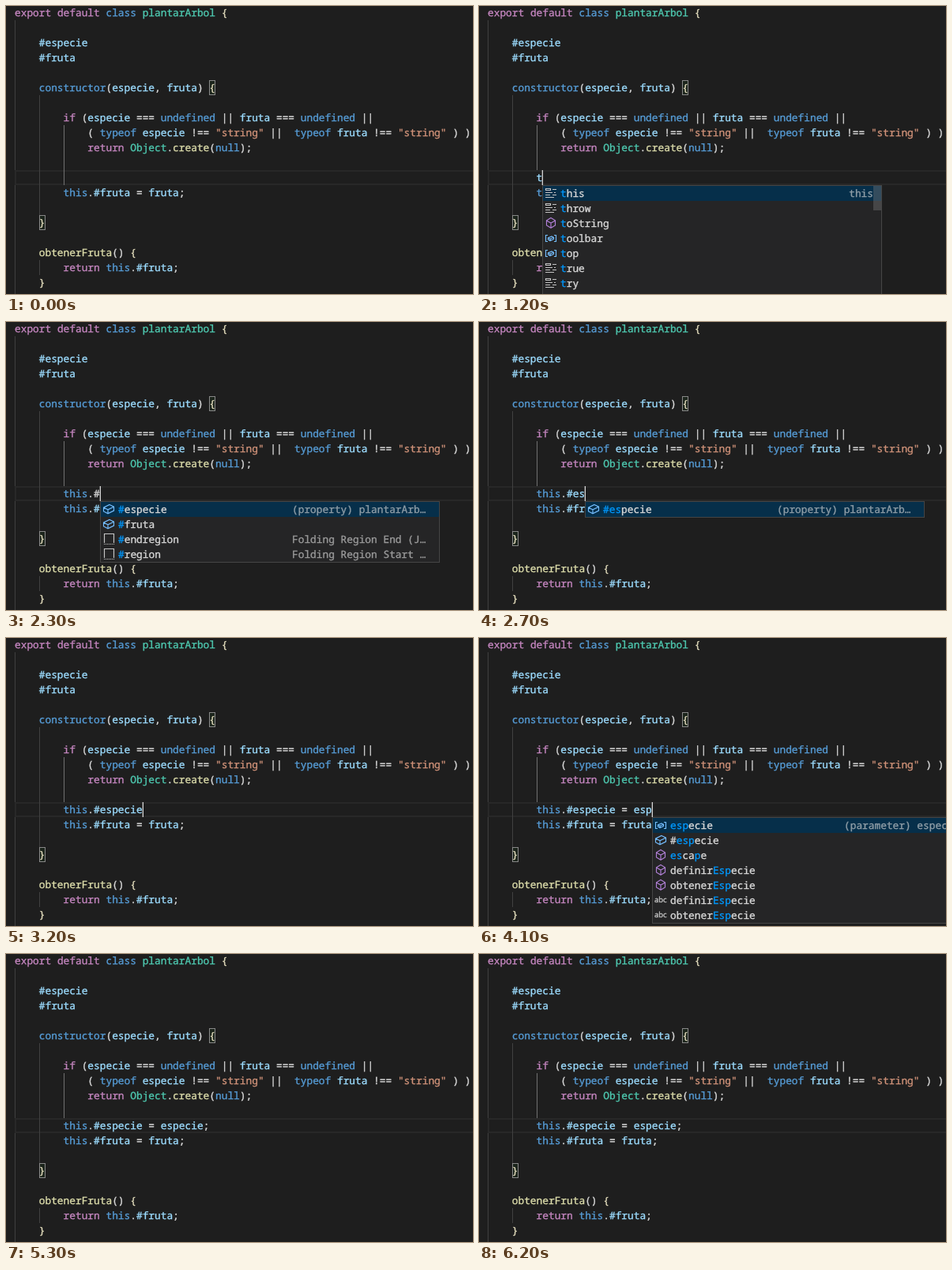
These frames come from a looping animation (591x365 px, 6.5 s). An HTML page:

```html
<!DOCTYPE html>
<html lang="es">
<head>
<meta charset="utf-8">
<title>Editor</title>
<style>
  html, body { margin: 0; width: 100%; height: 100%; overflow: hidden; background: #1e1e1e; }
  svg { display: block; width: 591px; height: 365px; }
  text, tspan { fill: currentColor; stroke: currentColor; stroke-width: .35px; }
  text { font: 12.83px "Noto Sans Mono", "DejaVu Sans Mono", monospace; text-rendering: geometricPrecision; white-space: pre; color: #d8d8d8; }
  .control { color: #c586c0; }
  .keyword { color: #569cd6; }
  .type { color: #4ec9b0; }
  .call { color: #dcdcaa; }
  .name { color: #9cdcfe; }
  .string { color: #ce9178; }
  .brace { color: #e2dcbc; }
  .match { color: #0097fb; }
  .detail { opacity: .65; }
  .abc { font: 9.5px "Open Sans", sans-serif; color: #c5c5c5; }
  .icon { fill: none; stroke-width: 1.15px; }
</style>
</head>
<body>
<svg viewBox="0 0 591 365" xmlns="http://www.w3.org/2000/svg">
  <g id="code"></g>
  <g id="typed"></g>
  <g id="popup"></g>
  <rect id="cursor" y="208" width="1.3" height="19" fill="#d4d4d4"/>
</svg>
<script>
const LOOP = 6500, CHAR = 7.697, LEFT = 10.5, ROW = 19, EDIT_ROW = 11, EDIT_COL = 8;
const BASELINE = 14, POPUP_TOP = 227, POPUP_WIDTH = 430;
const $ = id => document.getElementById(id);
const colX = col => LEFT + col * CHAR;
const rowY = row => row * ROW - 1;

const source = `export default class plantarArbol {

    #especie
    #fruta

    constructor(especie, fruta) {

        if (especie === undefined || fruta === undefined ||
            ( typeof especie !== "string" ||  typeof fruta !== "string" ) )
            return Object.create(null);


        this.#fruta = fruta;

    }

    obtenerFruta() {
        return this.#fruta;
    }`.split("\n");

const words = {
  control: ["export", "default", "return", "if"],
  keyword: ["class", "constructor", "undefined", "typeof", "null", "this"],
  type: ["plantarArbol", "Object"],
  call: ["create", "obtenerFruta"],
  brace: ["{", "}"]
};

function tokenClass(token) {
  if (token[0] === '"') return "string";
  const group = Object.keys(words).find(key => words[key].includes(token));
  return group || (/^#?\w/.test(token) ? "name" : "");
}

const rect = (x, y, w, h, attrs) => `<rect x="${x}" y="${y}" width="${w}" height="${h}" ${attrs}/>`;
const text = (x, y, content, cls = "") => `<text x="${x}" y="${y}" class="${cls}">${content}</text>`;

function codeLine(line, row, startCol = 0) {
  return [...line.matchAll(/"[^"]*"|#?\w+|[^\s\w"]/g)]
    .map(m => text(colX(startCol + m.index) + .5, rowY(row) + BASELINE, m[0], tokenClass(m[0])))
    .join("");
}

const guide = (x, fromRow, toRow, color = "#404040") =>
  rect(x, rowY(fromRow), 1, (toRow - fromRow) * ROW, `fill="${color}"`);
const bracketBox = (col, row) =>
  rect(Math.floor(colX(col)) + 1.5, rowY(row) + .5, 7, 18, 'fill="#1c251c" stroke="#888"');

const icons = {
  k: ["#c5c5c5", "M1.5 2.5h6v2h-6zM10 3.5h5M1 7.5h9M12 7.5h2M1 10.5h6M10 10.5h5M1 13.5h11"],
  m: ["#b180d7", "M8 1.5 13.5 4.8V11L8 14.3 2.5 11V4.8zM2.5 5 8 8l5.5-3M8 8v6.3"],
  f: ["#75beff", "M9 2.5 14.5 5.2v4.9L7 13.8 1.5 11V6.2zM1.5 6.2 7 8.8l7.5-3.6M7 8.8v5"],
  v: ["#75beff", "M4 4.5H1.5v8H4M12 4.5h2.5v8H12M9 6l2.5 1.3v2.2L7 11.5 4.5 10V7.8zM4.5 7.8 7 9.2l4.5-1.9M7 9.2v2.3"],
  s: ["#c5c5c5", "M2.5 13V1.5h12V13M2 14.5h1m1 0h1m1 0h1m1 0h1m1 0h1m1 0h1m1 0h1"]
};

function icon(kind, x, y) {
  if (kind === "a") return text(x, y + 11, "abc", "abc");
  const [color, path] = icons[kind];
  return `<path class="icon" transform="translate(${x} ${y})" stroke="${color}" d="${path}"/>`;
}

// Marks the query as one run where possible, otherwise letter by letter.
function highlight(label, query) {
  const lower = label.toLowerCase(), run = lower.indexOf(query);
  let next = 0;
  return [...label].map((char, i) => {
    const hit = run >= 0 ? i >= run && i < run + query.length : lower[i] === query[next];
    if (hit) next++;
    return hit ? `<tspan class="match">${char}</tspan>` : char;
  }).join("");
}

const PROPERTY = "(property) plantarArb…", PARAMETER = "(parameter) especie: …";
const details = { "s #endregion": "Folding Region End (J…", "s #region": "Folding Region Start …" };

function popup(left, { query, items, detail, scroll }) {
  const height = items.length * ROW + 2, firstRow = POPUP_TOP + 1;
  let out = rect(left, POPUP_TOP, POPUP_WIDTH, height, 'fill="#252526"')
    + rect(left, firstRow, POPUP_WIDTH, ROW, 'fill="#062f4a"');
  items.forEach((item, i) => {
    if (!item) return;
    const top = firstRow + i * ROW, label = item.slice(2);
    const info = i ? details[item] : detail;
    out += icon(item[0], left + 3, top + 1) + text(left + 23, top + BASELINE, highlight(label, query));
    if (info) {
      const offset = info.endsWith("…") ? 243 : 419 - info.length * CHAR;
      out += text(left + offset, top + BASELINE, info, "detail");
    }
  });
  if (scroll) out += rect(left + 419, firstRow, 11, 31, 'fill="#797979" fill-opacity=".4"');
  return out + rect(left + .5, POPUP_TOP + .5, POPUP_WIDTH - 1, height - 1, 'fill="none" stroke="#454545"');
}

const list = (query, detail, items, scroll) => ({ query, detail, items: items.split(","), scroll });
const species = "m definirEspecie,m obtenerEspecie,a definirEspecie,a obtenerEspecie";
const own = "v especie,f #especie,";
const thisItems = "k this,v globalThis,v TouchList";
const parameter = (query, extra = "") => list(query, PARAMETER, own + extra + species);
const property = query => list(query, PROPERTY, "f #especie");

// [start, typed text, suggestions]
const steps = [
  [0, ""],
  [1100, "t"],
  [1200, "t", list("t", "this", "k this,k throw,m toString,v toolbar,v top,k true,k try,", true)],
  [1300, "th", list("th", "this", "k this,k throw,v globalThis,v Touch,v TouchEvent,v TouchList")],
  [1400, "thi", list("thi", "this", thisItems)],
  [1600, "this", list("this", "this", thisItems)],
  [1800, "this."],
  [1900, "this.", list("", PROPERTY, "f #especie,f #fruta,m definirEspecie,m obtenerEspecie,m obtenerFruta,a constructor,a create,")],
  [2300, "this.#", list("#", PROPERTY, "f #especie,f #fruta,s #endregion,s #region")],
  [2500, "this.#e", list("#e", PROPERTY, "f #especie,s #endregion,s #region")],
  [2700, "this.#es", property("#es")],
  [2800, "this.#esp", property("#esp")],
  [2900, "this.#espe", property("#espe")],
  [3200, "this.#especie"],
  [3400, "this.#especie "],
  [3600, "this.#especie ="],
  [3800, "this.#especie = "],
  [3900, "this.#especie = e"],
  [4000, "this.#especie = es", list("es", PARAMETER, own + "m escape," + species + ",")],
  [4100, "this.#especie = esp", parameter("esp", "m escape,")],
  [4200, "this.#especie = espe", parameter("espe", "m escape,")],
  [4400, "this.#especie = espec", parameter("espec")],
  [4500, "this.#especie = especi", parameter("especi")],
  [4600, "this.#especie = especie", parameter("especie")],
  [4800, "this.#especie = especie;"]
];

$("code").innerHTML =
  guide(11, 1, 20) + rect(12, 209, 600, 17, 'fill="none" stroke="#282828" stroke-width="2"')
  + guide(42, 6, 14) + guide(42, 17, 18) + guide(73, 8, 11, "#707070")
  + bracketBox(32, 5) + bracketBox(4, 14)
  + source.map((line, row) => codeLine(line, row)).join("");

function show([, typed, suggestions]) {
  const cursorX = Math.floor(colX(EDIT_COL + typed.length));
  $("typed").innerHTML = typed ? codeLine(typed, EDIT_ROW, EDIT_COL) : guide(73, 11, 12, "#707070");
  $("popup").innerHTML = suggestions ? popup(cursorX + 1, suggestions) : "";
  $("cursor").setAttribute("x", cursorX + .7);
}

const start = performance.now();
let current;

function frame() {
  const t = (performance.now() - start) % LOOP;
  const step = steps.findLast(([from]) => from <= t);
  if (step !== current) show(current = step);
  const lit = t >= 600 && t < 5300 || t >= 5800 && t < 6200;
  $("cursor").setAttribute("visibility", lit ? "visible" : "hidden");
  requestAnimationFrame(frame);
}
frame();
</script>
</body>
</html>
```
